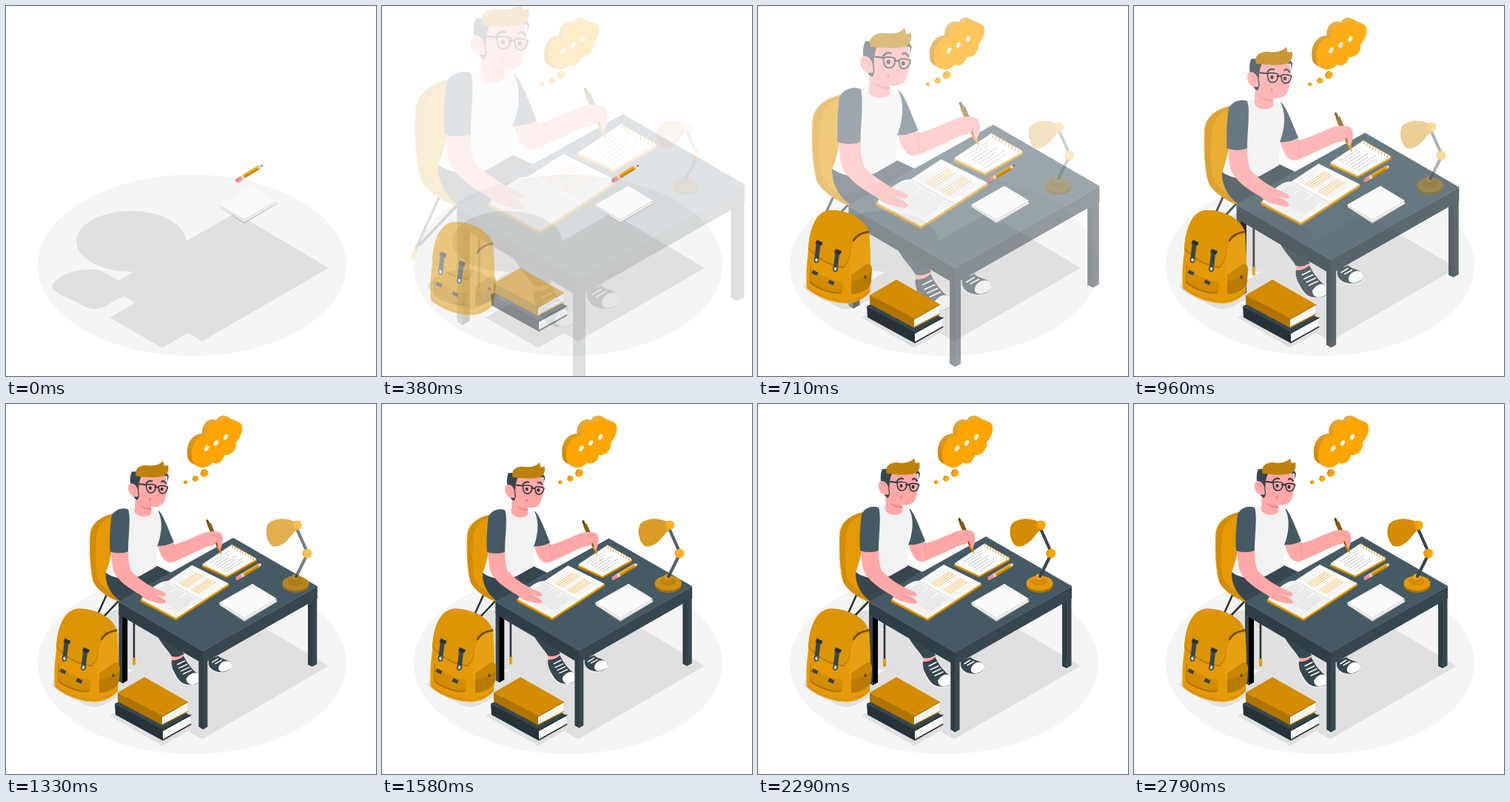
Write an HTML page with a canvas that moves like this. It is 500 px wide and 500 px high and loops after 2.83 s.

```html
<!DOCTYPE html>
<html lang="en">
<head>
<meta charset="utf-8">
<title>Studying at a desk</title>
<style>
html, body { margin: 0; width: 100%; height: 100%; overflow: hidden; background: #fff; }
canvas { display: block; }
</style>
</head>
<body>
<canvas id="stage" width="500" height="500"></canvas>
<script>
const LOOP = 2830;
const stage = document.getElementById('stage').getContext('2d');
const buffer = document.createElement('canvas');
buffer.width = buffer.height = 500;
const layer = buffer.getContext('2d');
let g = stage;

const ORANGE = '#ffa500', AMBER = '#e59a05', GOLD = '#d48c02', BROWN = '#b07300';
const SLATE = '#455a64', DARK = '#37474f', NIGHT = '#263238';
const SKIN = '#ffa8a7', BLUSH = '#f28f8f', WHITE = '#fff', GREY = '#e0e0e0';

function fill(d, color) {
  g.fillStyle = color;
  g.fill(new Path2D(d));
}
function line(d, color, width = 1, cap = 'round') {
  g.strokeStyle = color;
  g.lineWidth = width;
  g.lineCap = cap;
  g.lineJoin = 'round';
  g.stroke(new Path2D(d));
}
function oval(x, y, rx, ry, color, turn = 0) {
  g.fillStyle = color;
  g.beginPath();
  g.ellipse(x, y, rx, ry, turn, 0, 7);
  g.fill();
}

// Maps (u, v) on a parallelogram: u runs up-right, v runs down-right.
const plane = (x, y, ux, uy, vx, vy) => (u, v) =>
  `${(x + ux * u + vx * v).toFixed(2)} ${(y + uy * u + vy * v).toFixed(2)}`;

function rule(at, u0, u1, v, color, width) {
  line(`M${at(u0, v)}L${at(u1, v)}`, color, width, 'butt');
}

function drawFloor() {
  oval(251.5, 350.5, 208.5, 122.5, '#f5f5f5');
  oval(169, 318, 74, 41, GREY);
  fill('M243 318L308 281L316 283L436 354L265 453L246 442L211 462L140 421L175 401L159 392L152 371L171 360L200 335Z', GREY);
  fill('M62 378C66 369 80 361 95 358C110 355 123 355 129 358L152 371L178 377L159 392L133 406C122 412 113 410 102 404C88 395 63 389 62 378Z', GREY);
}

function drawChair() {
  line('M134 256L110 309M150 266L114 304', NIGHT, 2.6);
  line('M110 309L107.500 316', AMBER, 3.6);
  line('M171 280V346', NIGHT, 2.6);
  line('M171 346V353', AMBER, 4);
  fill('M148 145C130 147 112 157 110.500 174C109 200 111 226 115 240C119 250 134 262 154 269L172 266L160 145Z', GOLD);
  fill('M150 147C134 150 122 159 119.500 174C116.500 200 117 223 121 236C126 247 142 257 158 266L172 260L164 146Z', AMBER);
  line('M148 146C130 148 113 157 111 174C109.500 200 111 226 115.500 240', '#e9a01a', .8);
}

function drawShoes() {
  fill('M203 300L224 300L240 340C235 344 229 345 223 343C218 334 208 325 203 314Z', DARK);
  fill('M222 342C228 345 234 343 239 340L240 346L225 350Z', SKIN);
  fill('M223 348C229 349 236 346 239.500 342C244 352 251 361 258 366C265 372 264 380 254 382C242 386 234 378 229 369C225 363 222 355 223 348Z', DARK);
  fill('M243 374C247 367 253 364 258 366C265 371 264 379 255 381C249 383 244 381 243 374Z', WHITE);
  line('M225 363C229 374 236 383 248 382.500C256 383 262 381 263 376', '#f0f0f0', 1.4);
  line('M231 354L241 349M233 359L244 354M236 363L247 358M239 367L250 362', WHITE, 1.5);
  fill('M274 344C280 345 284 344 287 342C292 347 301 347 305 352C309 359 302 364 293 365C282 365 275 360 274 353Z', DARK);
  fill('M288 357C290 350 300 346 305 352C309 359 301 363 294 364C289 364 287 361 288 357Z', WHITE);
  line('M274 357C279 365 291 367 300 364C304 362 307 359 306 356', '#f0f0f0', 1.4);
  line('M279 351L287 346M283 353L292 348', WHITE, 1.5);
}

function drawHead() {
  fill('M173 119L194 128L195 146C188 152 177 151 172 144Z', SKIN);
  fill('M178 133C184 137 190 138 195 137L195 141C187 141 181 138 178 133Z', BLUSH);
  fill('M168 88C164 96 166 108 169 119C171 124 173 126 176 127L182 112L186 96L217 94C217 100 217 104 216 106L219 94L214 86Z', DARK);
  fill('M181 94C190 92 205 91 215 94C218 106 217 120 212 130C207 139 191 138 184 131C176 124 176 106 181 94Z', SKIN);
  fill('M176 112C173 103 164 101 163 109C162 117 168 125 177 122Z', SKIN);
  line('M167 108C171 108 173 112 173 116', BLUSH, 1);
  fill('M174 94C171 85 177 79 188 79C198 81 208 78 211 73L213 80L218 79C220 86 217 92 211 94C201 97 184 95 174 94Z', '#bd8109');
  line('M188 104C190 101 193 100 196 101M209 102C211 100 213 101 215 104', DARK, 2.2);
  oval(193.5, 110.5, 2, 2.4, NIGHT);
  oval(209.5, 112, 2, 2.4, NIGHT);
  line('M204 114C206 117 207 120 203 120', BLUSH, 1.1);
  line('M192 126C194 124 195 126 193 128', '#e87f83', 1.5);
  line('M179 105L188 106M200 109L205 109.500', NIGHT, 1.8);
  line('M188 106C193 104.500 199 105.500 201 107C201 113 199 117 194 117C190 117 188 113 188 106ZM205 108C209 106.500 214 107.500 217.500 109C216.500 115 214 118 210 118C206 118 205 113 205 108Z', NIGHT, 1.5);
}

function drawBody() {
  fill('M132 226C140 235 165 237 178 232L203 218L222 227L184 249L153 267C140 259 131 244 132 226Z', DARK);
  fill('M157 143C164 138 167 138 172 138C177 149 190 150 194 139C204 142 210 150 209 163C207 180 202 193 202 219L179 232C163 238 143 236 132 227C137 216 139 202 142 190Z', '#f2f2f2');
  line('M171 139C176 151 190 152 195 140', GREY, 1.2);
  fill('M204 141C210 144 218 166 226 185C220 189 211 191 203 191C207 180 211 164 207 149Z', SLATE);
  drawHead();
}

function drawDesk() {
  fill('M150 266V377L155 380L162 376V280Z', DARK);
  fill('M155 280V380L162 376V280Z', '#000');
  fill('M411 254V354L417 357L423.500 353.500V246Z', DARK);
  fill('M411 254V354L417 357V254Z', '#2f3f46');
  fill('M260.500 331V440L266.500 443.500L272.500 440V331Z', DARK);
  fill('M260.500 331V440L266.500 443.500V331Z', '#303f46');
  fill('M150 267L266 334V353L150 285Z', '#303f46');
  fill('M424 246L266 335V353L424 263Z', DARK);
  fill('M308 179L424 246L266 336L150 267Z', SLATE);
  line('M150.500 268L266 335.500L423.500 246.500', '#536872', .7);
}

function drawOpenBook() {
  fill('M180 264L251 218L302 243V246L229 293.500L180 268Z', BROWN);
  fill('M180 264L251 218L302 243V244.500L229 292L180 266.500Z', AMBER);
  fill('M182 262L251 217L301 242V243L229 290L182 265Z', WHITE);
  fill('M182 262C196 247 209 237 218 239L266 265C253 264 240 276 229 287Z', '#f2f2f2');
  line('M182 264L229 288.500C241 278 253 266 265 266', '#d6d6d6', .7);
  line('M218 239L265 265', '#d8d8d8', .9);
  const left = plane(182, 262, 36, -23, 47, 25);
  for (let i = 0; i < 15; i++) rule(left, .2, i % 5 === 4 ? .65 : .9, .08 + i * .058, '#cbcbcb', .7);
  const right = plane(218, 239, 32, -21, 47, 26);
  for (let i = 0; i < 15; i++) {
    const marked = i > 2 && i < 7 || i > 8 && i < 13;
    rule(right, .12, .91, .08 + i * .058, marked ? '#f3d498' : '#d4d4d4', marked ? 1.6 : .7);
  }
}

function drawNotebook() {
  fill('M265 218L307 190L340 210V212L299 235L265 220Z', BROWN);
  fill('M265 217L307 189L340 209V210.500L299 233.500L265 218Z', AMBER);
  fill('M266 215L306 188.500L339.500 207.500V209L299 232L266 216.500Z', WHITE);
  line('M266 215.500L299 231L339 208', '#ececec', .8);
  const at = plane(266, 215, 40, -26, 33, 17);
  for (let row = 0; row < 7; row++) {
    let d = '';
    const end = .78 - (row * 37 % 5) * .05;
    for (let i = 0; i <= 26; i++) {
      const gap = (i + row * 3) % 6 === 0;
      d += (i && !gap ? 'L' : 'M') + at(.14 + (end - .14) * i / 26, .15 + row * .115 + Math.sin(i * 2.1 + row) * .025);
    }
    line(d, '#a3abaf', .55);
  }
  for (let i = 0; i < 9; i++) {
    const x = 308 + i * 3.6, y = 191 + i * 2.05;
    line(`M${x - 1} ${y + 2}C${x - 2} ${y - 2} ${x + 1} ${y - 3} ${x + 2} ${y}`, BROWN, .8);
  }
}

function drawArms() {
  fill('M204 190C211 191 219 189 225 186C227 188 227 188 228 188C242 184 258 176 271 171L278 189C262 195 244 205 226 212C215 216 208 207 204 190Z', SKIN);
  line('M226 188L227 209', BLUSH, .6);
  fill('M139 197L163 198C163 209 164 218 167 225C180 239 197 248 207 252C214 255 217 258 213 260C208 260 203 257 200 257C207 260 214 264 215 268C213 272 204 269 197 267C190 266 184 262 180 258C164 249 148 238 143 225C140 217 141 207 139 197Z', SKIN);
  line('M196 260C202 261 208 264 213 267', BLUSH, .8);
  fill('M140 149C145 139 156 137 163 140C167 151 163 177 163 198C156 201 145 201 138 198C137 182 138 163 140 149Z', SLATE);
  line('M272 155.500L274 160', '#654407', 3.2);
  line('M274 160L288 192', '#8b5c08', 4.8, 'butt');
  line('M276.500 159L282 172', '#654407', 1);
  fill('M284.500 191.500L290.500 189L292 203Z', GOLD);
  fill('M266 174C273 170 282 169 290 172C293 174 294 181 293 187C292 191 291 194 289 195C287 193 287 188 285 185C282 190 278 191 272 190Z', SKIN);
  line('M277 176C283 174 287 178 286 185M286 174C291 176 291 181 290 189', BLUSH, .8);
}

function drawScene() {
  drawChair();
  drawBody();
  drawShoes();
  drawDesk();
  drawOpenBook();
  drawNotebook();
  drawArms();
}

function drawPencil() {
  line('M313 238L343 219', 'rgba(55,71,79,.22)', 3);
  line('M312.500 235.500L319 231.500', '#f0969a', 5.2, 'butt');
  oval(312.5, 235.5, 2.3, 2.7, '#e5848b');
  line('M318.500 232L321.500 230', '#f4dcae', 5.2, 'butt');
  line('M321.500 230L341 218.500', AMBER, 5.2, 'butt');
  line('M322 231.700L341 220.300', '#bd7d06', 1.5, 'butt');
  line('M321 228.300L340 217', '#ffb52b', 1.2, 'butt');
  fill('M339.500 216L347.500 215L342.500 220.500Z', '#f6cfa5');
  fill('M344.500 215.400L347.500 215L345.500 217.300Z', NIGHT);
}

function drawPaper() {
  fill('M289 272L331 247L367 267L322 294Z', '#bdbdbd');
  fill('M288 270L332 245L366 266L322 291Z', '#f0f0f0');
  line('M289 271L322 291.500L366 266', WHITE, 1);
  fill('M288 269.500L333 244L366 264L322 289.500Z', '#d5d5d5');
  fill('M288 268.500L333 243L366 263L322 288.500Z', '#fafafa');
}

function drawBubble() {
  const cloud = 'M249 70C248 56 256 43 269 43C268 30 278 20 288 25C292 17 303 16 305 25C313 22 318 27 317 35C316 43 312 48 309 52C310 62 302 70 293 69C291 78 284 83 277 79C271 87 260 88 257 83C251 82 249 76 249 70Z';
  const side = g.createLinearGradient(285, 18, 255, 85);
  side.addColorStop(0, '#ecae3c');
  side.addColorStop(1, '#cc8604');
  for (let i = 6; i >= 0; i--) {
    g.save();
    g.translate(-i, -i * .5);
    fill(cloud, i ? side : ORANGE);
    g.restore();
  }
  oval(269, 60, 2.5, 4.3, WHITE, .45);
  oval(282, 52.5, 2.5, 4.3, WHITE, .45);
  oval(295, 44.5, 2.5, 4.3, WHITE, .45);
  for (const [x, y, r] of [[266.5, 93.5, 5.2], [254.5, 101, 3.8], [241, 106, 2.4]]) {
    oval(x - 1, y - .4, r * .85, r, '#d08a08', .5);
    oval(x + .5, y, r * .8, r, ORANGE, .5);
  }
}

function drawLamp() {
  oval(382.5, 245, 18, 10, BROWN);
  oval(382.5, 242, 18, 10, AMBER);
  oval(382, 239.5, 11, 6, GOLD);
  oval(382, 233.5, 5, 4, ORANGE);
  line('M384 169L397 198M397 205L383 233', DARK, 4.2);
  oval(397.5, 202, 6.3, 6.3, AMBER);
  oval(399, 201.5, 4.8, 5.6, ORANGE);
  fill('M381 159C369 153 352 154 345 162C340 170 343 187 351 192C358 194 365 190 371 184C376 179 378 175 384 170Z', GOLD);
  line('M346 162C342 171 345 185 352 191', '#c58202', 1);
  oval(384, 164, 6.5, 6.5, AMBER);
  oval(385.5, 163, 5, 5.3, ORANGE);
}

function strap(x, y, length) {
  line(`M${x} ${y}L${x - 3} ${y + length}`, DARK, 6, 'butt');
  line(`M${x - 3.5} ${y}L${x + 4.5} ${y + 3.5}`, NIGHT, 5, 'butt');
  oval(x - 3, y + length - 1, 3.4, 4, DARK);
  oval(x - 3, y + length - 1, 1.8, 2.4, '#e6e6e6');
}

function drawBackpack() {
  fill('M69 323C70 300 79 280 95 277C113 275 142 288 150 305C152 330 153 362 151 388C142 398 130 403 119 402.500C98 402 76 392 66 382C64 361 67 341 69 323Z', AMBER);
  fill('M126 325C130 314 140 307 150 306L152 352C140 356 128 365 125 374C121 369 123 343 126 325Z', '#e8a013');
  line('M67 380C78 391 99 398.500 119 399.500C131 399 142 394 150 387', GOLD, 1.2);
  fill('M71 351C76 344 110 358 113 370L113 388C107 394 74 382 70 374Z', BROWN);
  fill('M72 349C77 342 111 356 115 367L114 386C108 392 75 380 71 372Z', GOLD);
  fill('M72 349C77 342 111 356 115 367L114 373C104 373 83 364 72 356Z', AMBER);
  fill('M68 329C70 302 79 280 95 277C115 275 139 285 147 300C135 305 128 313 126 326C125 342 121 350 115 355C96 352 80 343 68 329Z', '#b87800');
  fill('M68 327C70 300 79 280 95 277C115 275 139 285 147 300C135 305 128 313 126 325C125 340 121 348 115 353C96 350 80 341 68 327Z', '#de9504');
  line('M129 318C133 311 141 307 149 306', '#795006', 3);
  strap(82, 319, 26);
  strap(107.5, 331, 26);
  line('M73.500 359.500L80.500 363M95.500 372.500L102.500 376', DARK, 4.8, 'butt');
  fill('M126 364C134 360 143 351 149 349C155 350 154 361 153 374C150 384 138 390 126 390Z', '#b87a00');
  fill('M126 364C134 360 143 351 149 349C153 350 154 353 154 360C147 368 135 372 126 372Z', '#c98602');
  oval(145, 367, 2, 2.4, '#6e4908');
}

function drawBooks() {
  fill('M147 405L184 386L250 421L212 442Z', DARK);
  fill('M147 405L212 440V455L148 420Z', NIGHT);
  fill('M212 442L249 421V434L212 453Z', WHITE);
  line('M213 448L248 428M213 451L248 431', '#dcdcdc', .7);
  line('M212 441L249.500 420.500M212 454L249.500 433', NIGHT, 1.8);
  fill('M151 390L187 369L246 402.500L211 422Z', GOLD);
  fill('M151 390L211 421.500V434L151 402Z', BROWN);
  fill('M211 423L245 404V416L211 433Z', WHITE);
  line('M212 427L244 409M212 430L244 413', '#dcdcdc', .7);
  line('M211 422L245.500 403M211 433.500L245.500 415.500', '#bd7d02', 1.4);
}

// Cubic easing with an overshoot, solved by bisection.
function ease(x) {
  if (x <= 0) return 0;
  if (x >= 1) return 1;
  const curve = (a, b, s) => 3 * s * (1 - s) * ((1 - s) * a + s * b) + s * s * s;
  let lo = 0, hi = 1;
  for (let i = 0; i < 24; i++) {
    const mid = (lo + hi) / 2;
    if (curve(.36, .5, mid) < x) lo = mid; else hi = mid;
  }
  return curve(-.01, 1.38, lo);
}

function reveal(draw, t, { span, dx = 0, dy = 0, zoom = 0 }) {
  const p = ease(t / span), rest = 1 - p;
  if (p <= 0) return;
  g = layer;
  g.clearRect(0, 0, 500, 500);
  g.save();
  g.translate(266 + dx * rest, 258 + dy * rest);
  g.scale(1 + zoom * rest, 1 + zoom * rest);
  g.translate(-266, -258);
  draw();
  g.restore();
  g = stage;
  g.globalAlpha = Math.min(1, p);
  g.drawImage(buffer, 0, 0);
  g.globalAlpha = 1;
}

function render(t) {
  g = stage;
  g.fillStyle = WHITE;
  g.fillRect(0, 0, 500, 500);
  drawFloor();
  reveal(drawScene, t, { span: 1800, zoom: .5 });
  drawPencil();
  drawPaper();
  reveal(drawBubble, t, { span: 1600, dx: -30 });
  reveal(drawLamp, t, { span: 2800, dx: 30 });
  reveal(drawBackpack, t, { span: 1000, dy: 30 });
  reveal(drawBooks, t, { span: 1000, dy: -30 });
}

const start = performance.now();
function tick() {
  render((performance.now() - start) % LOOP);
  requestAnimationFrame(tick);
}
tick();
</script>
</body>
</html>
```
